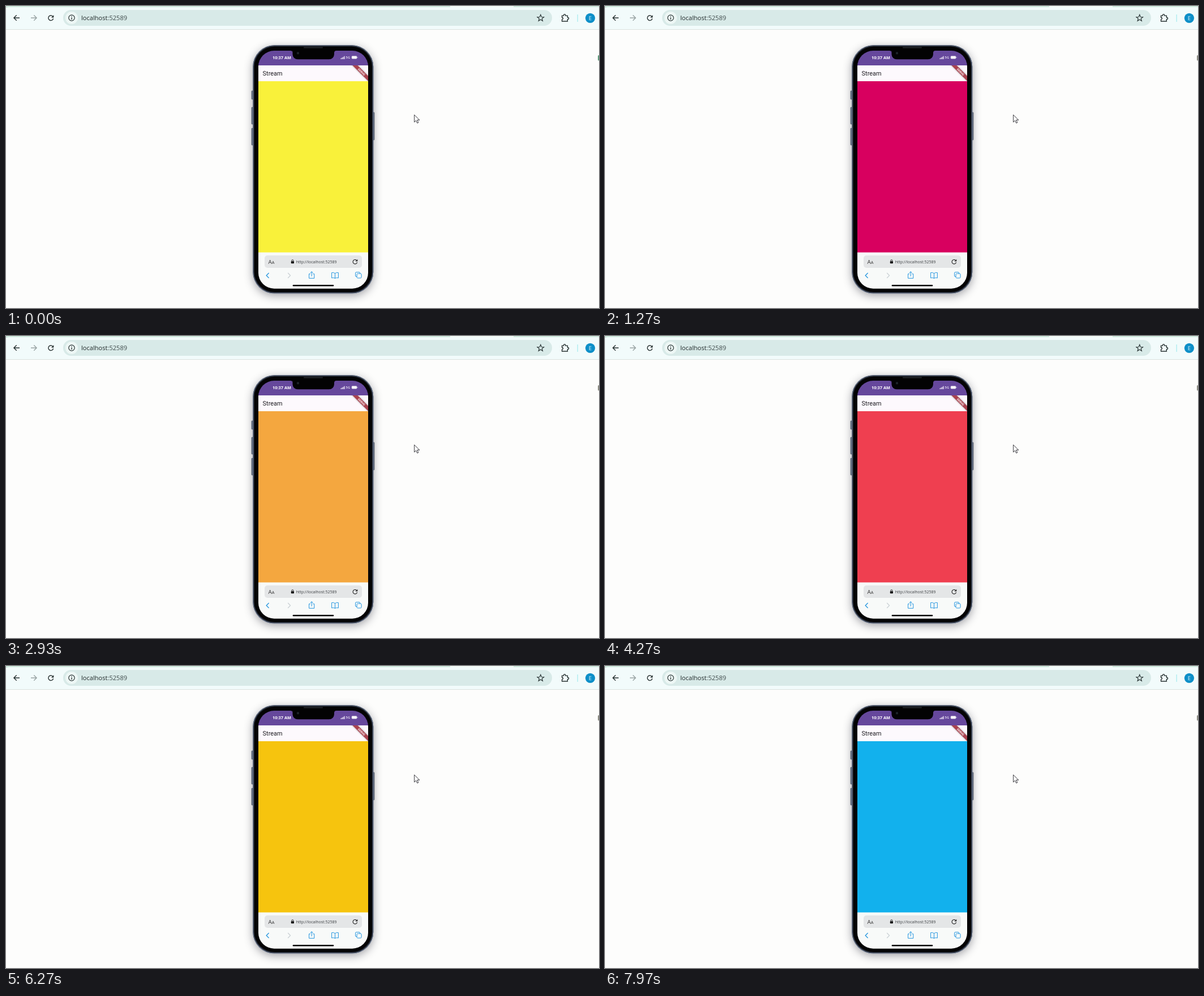
Write an HTML page with a canvas that moves like this. It is 1048x534 px and loops after 8000 ms.

```html
<!DOCTYPE html>
<html lang="en">
<head>
<meta charset="utf-8">
<title>Colour stream</title>
<style>
  html, body { margin: 0; width: 100%; height: 100%; overflow: hidden; background: #fdfdfc; }
  canvas { display: block; }
</style>
</head>
<body>
<canvas id="stage" width="1048" height="534"></canvas>
<script>
const ctx = document.getElementById('stage').getContext('2d');
const LOOP = 8000, TICK = 1000, FIRST = 500;
const COLORS = ['#f9f13a', '#d8005f', '#4caf50', '#f4a73f', '#ef3f50',
                '#607e88', '#f6c40e', '#673ab7', '#12b1ed'];
const SANS = '"Open Sans", "Noto Sans", sans-serif';

function rect(x, y, w, h, fill) {
  ctx.fillStyle = fill;
  ctx.fillRect(x, y, w, h);
}

function round(x, y, w, h, r, fill, stroke, line = 1) {
  ctx.beginPath();
  ctx.roundRect(x, y, w, h, r);
  if (fill) { ctx.fillStyle = fill; ctx.fill(); }
  if (stroke) { ctx.strokeStyle = stroke; ctx.lineWidth = line; ctx.stroke(); }
}

function disc(x, y, r, fill) {
  ctx.beginPath();
  ctx.arc(x, y, r, 0, 7);
  ctx.fillStyle = fill;
  ctx.fill();
}

function path(d, stroke, line = 1, fill) {
  const p = new Path2D(d);
  if (fill) { ctx.fillStyle = fill; ctx.fill(p); }
  if (stroke) { ctx.strokeStyle = stroke; ctx.lineWidth = line; ctx.stroke(p); }
}

function text(s, x, y, font, fill, align = 'left') {
  ctx.font = font;
  ctx.fillStyle = fill;
  ctx.textAlign = align;
  ctx.fillText(s, x, y);
}

// Open ring with an arrow head at the upper right
function reload(x, y, r, color, line) {
  ctx.beginPath();
  ctx.arc(x, y, r, 0.25, 5.45);
  ctx.strokeStyle = color;
  ctx.lineWidth = line;
  ctx.stroke();
  path(`M${x + r + 0.6} ${y - r - 0.8}v${r}h${-r}z`, null, 1, color);
}

function star(x, y, r) {
  ctx.beginPath();
  for (let i = 0; i < 10; i++) {
    const a = i * Math.PI / 5 - Math.PI / 2, d = i % 2 ? r * 0.43 : r;
    ctx.lineTo(x + d * Math.cos(a), y + d * Math.sin(a));
  }
  ctx.closePath();
  ctx.strokeStyle = '#2b3636';
  ctx.lineWidth = 1.2;
  ctx.stroke();
}

function drawToolbar() {
  const ink = '#263030';
  rect(0, 0, 1048, 3, '#cfeade');
  rect(785, 0, 112, 3, '#f2faf5');
  round(0, 2, 1048, 39, [5, 0, 0, 0], '#f2fbfb');
  rect(0, 41, 1048, 1, '#d9e1df');

  path('M24 21H14M18.7 16.2L13.9 21L18.7 25.8', ink, 1.4);
  path('M44 21H54M49.3 16.2L54.1 21L49.3 25.8', '#98a3a3', 1.4);
  reload(79.3, 21.2, 4.4, ink, 1.4);

  round(101, 7, 864, 28, 14, '#d8eae8');
  disc(116, 21, 11, '#edf7f5');
  ctx.beginPath();
  ctx.arc(116, 21, 5.2, 0, 7);
  ctx.strokeStyle = ink;
  ctx.lineWidth = 1.2;
  ctx.stroke();
  rect(115.4, 20.2, 1.3, 3.8, ink);
  rect(115.4, 17.8, 1.3, 1.3, ink);

  const font = '11.1px ' + SANS;
  text('localhost', 133, 25, font, '#1f2929');
  text(':52589', 133 + ctx.measureText('localhost').width, 25, font, '#3f4b4b');

  star(944.8, 21.4, 6.1);
  path('M982.6 17.1H985.6V16.2a1.6 1.6 0 0 1 3.2 0V17.1H992.4V20.3H993a1.6 1.6 0 0 1 0 3.2H992.4V27H982.6V23.9a1.8 1.8 0 0 0 0-3.6z', ink, 1.4);
  rect(1009.5, 15, 1.5, 13, '#b2eef0');
  disc(1032.5, 21.3, 8.6, '#0d8fc8');
  text('E', 1032.5, 24.8, '9.5px ' + SANS, '#e8f7fc', 'center');
}

function drawBody() {
  const sides = [[434, 150, 15], [434, 179, 30], [434, 216, 30], [648, 188, 49]];
  for (const [x, y, h] of sides) round(x, y, 3, h, 1, '#76869b', '#47505d', 0.6);

  ctx.save();
  ctx.shadowColor = 'rgba(30,30,45,.42)';
  ctx.shadowBlur = 16;
  ctx.shadowOffsetY = 4;
  round(436.3, 69.3, 213, 439, 38, '#252a35');
  ctx.restore();
  round(436.8, 69.8, 212, 438, 37.5, null, '#6f7d94', 1.1);
  round(438.8, 71.8, 208, 434, 36, '#030304');
}

function drawBanner() {
  ctx.save();
  ctx.beginPath();
  ctx.rect(600, 105, 40, 42);
  ctx.clip();
  ctx.translate(640, 105);
  ctx.rotate(Math.PI / 4);
  ctx.shadowColor = 'rgba(0,0,0,.45)';
  ctx.shadowBlur = 3;
  rect(-24, 13.2, 48, 6.3, '#aa434f');
  ctx.shadowColor = 'transparent';
  text('DEBUG', 0, 18.2, '900 5px Roboto, sans-serif', '#f7e6e8', 'center');
  ctx.restore();
}

function drawStatus() {
  rect(446, 79, 194, 26, '#66489c');
  text('10:37 AM', 471, 94, 'bold 7.4px ' + SANS, '#fff');
  for (let i = 0; i < 4; i++) rect(591.5 + i * 2, 92.3 - i * 1.2, 1.3, 1.7 + i * 1.2, '#eee8f5');
  text('5G', 600.6, 93.4, '600 5.8px ' + SANS, '#f4effa');
  round(611, 88.6, 9, 4.6, 1.2, '#fff', '#cfc4df', 0.5);
  rect(620.6, 89.9, 0.9, 2, '#d9d0e6');
}

function drawBrowserBar() {
  const blue = '#2495df';
  rect(446, 435.7, 194, 65, '#f8faf9');
  round(457, 441, 172, 22, 5, '#e4e6e7');
  text('A', 463.4, 456, '9.8px ' + SANS, '#333');
  text('A', 469.8, 456, '7.4px ' + SANS, '#333');
  round(503.8, 451.2, 5.2, 4.1, 0.7, '#111');
  path('M504.9 451.4v-1.2a1.5 1.5 0 0 1 3 0v1.2', '#111', 0.9);
  text('http://localhost:52589', 512.7, 454.6, '7px ' + SANS, '#3a3d40');
  reload(616.9, 452.3, 3.8, '#222', 1.1);

  path('M464.6 472L460.2 476.5L464.6 481', blue, 1.3);
  path('M498.2 472L502.6 476.5L498.2 481', '#c9d0d4', 1.2);
  path('M538 473.7H535.6V481.4H544.8V473.7H542.4M540.2 478V469.8M537.8 472L540.2 469.6L542.6 472', blue, 1);
  path('M581.5 472.8Q578.5 470.4 575.6 471.6V480.9Q578.6 479.8 581.5 481.5Q584.4 479.8 587.4 480.9V471.6Q584.5 470.4 581.5 472.8V481.4', blue, 1);
  round(617.6, 470.7, 8, 7.8, 1.5, null, blue);
  round(620.1, 473.2, 8, 7.8, 1.5, '#f8faf9', blue);
  round(506.7, 493, 72.6, 2.5, 1.2, '#050505');
}

function drawScreen(color) {
  ctx.save();
  ctx.beginPath();
  ctx.roundRect(446, 79, 194, 420.7, 28);
  ctx.clip();
  drawStatus();
  rect(446, 105, 194, 28, '#fdf9fd');
  text('Stream', 453.6, 122.6, '10.9px Roboto, sans-serif', '#1d1b20');
  drawBanner();
  rect(446, 133, 194, 303, color);
  drawBrowserBar();
  ctx.restore();

  round(506.5, 74, 73.5, 20.3, [0, 0, 9, 9], '#030304');
  path('M502.5 79Q506.5 79 506.5 83V78H580V83Q580 79 584 79V77H502.5z', null, 1, '#030304');
  round(526, 72.6, 34, 2, 1, '#25272b');
  disc(516, 83.4, 2.3, '#171b20');
  disc(516, 83.4, 0.8, '#303b44');
}

function drawCursor() {
  path('M721.6 192.4V205.3L724.6 202.5L726.8 207.1L728.9 206.1L726.7 201.7H730.9z', '#25252b', 0.9, '#fff');
}

function draw(t) {
  const step = t < FIRST ? 0 : 1 + Math.floor((t - FIRST) / TICK);
  rect(0, 0, 1048, 534, '#fdfdfc');
  drawToolbar();
  round(1046, 87, 4, 9.5, 1.5, t < 30 ? '#5e9b7b' : '#8d8d83');
  drawBody();
  drawScreen(COLORS[step]);
  drawCursor();
}

const start = performance.now();
function frame() {
  draw((performance.now() - start) % LOOP);
  requestAnimationFrame(frame);
}
frame();
</script>
</body>
</html>
```
